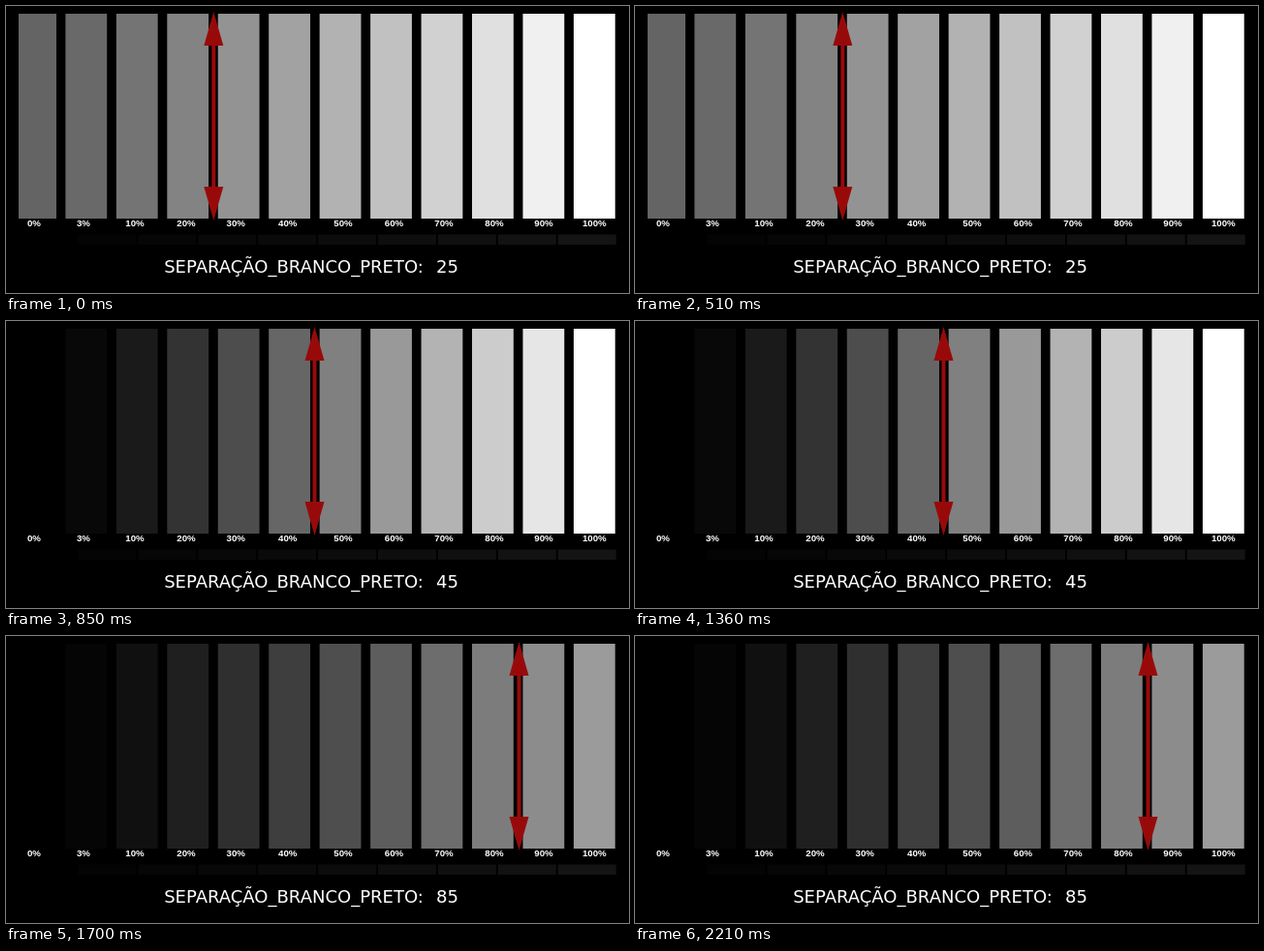
Write an HTML page that moves like this. It is 643x297 px and loops after 2550 ms.

```html
<!DOCTYPE html>
<html lang="pt">
<head>
<meta charset="utf-8">
<title>Separação branco e preto</title>
<style>
  html, body { margin: 0; width: 100%; height: 100%; overflow: hidden; background: #000; }
  svg { display: block; width: 643px; height: 297px; }
  .label { font: bold 9.7px "Liberation Sans", Arial, sans-serif; fill: #fff; text-anchor: middle; }
  .caption { font: 18px "DejaVu Sans", sans-serif; fill: #fff; }
  .arrow { fill: #980a0a; }
  .scene { visibility: hidden; animation: show 2550ms step-end infinite; }
  @keyframes show {
    0% { visibility: visible; }
    33.3333%, 100% { visibility: hidden; }
  }
</style>
</head>
<body>
<svg id="stage" viewBox="0 0 643 297">
  <text class="caption" x="163.2" y="276">SEPARAÇÃO_BRANCO_PRETO:</text>
</svg>
<script>
  const stage = document.getElementById('stage');
  const levels = [0, 3, 10, 20, 30, 40, 50, 60, 70, 80, 90, 100];
  const labelX = [29, 80, 133, 186, 237.3, 290.7, 348, 400.5, 452, 504, 555, 607.3];

  // black and white are the output greys at 0% and 100%
  const scenes = [
    { value: 25, black: 100, white: 255, x: 214.3 },
    { value: 45, black: 0, white: 255, x: 318.5 },
    { value: 85, black: 0, white: 155, x: 529.5 }
  ];

  function add(parent, tag, attrs, text) {
    const el = document.createElementNS('http://www.w3.org/2000/svg', tag);
    for (const key in attrs) el.setAttribute(key, attrs[key]);
    if (text !== undefined) el.textContent = text;
    parent.appendChild(el);
    return el;
  }

  function box(parent, x, y, width, height, grey) {
    const g = Math.round(grey);
    add(parent, 'rect', { x, y, width, height, fill: `rgb(${g},${g},${g})` });
  }

  levels.forEach((level, i) => {
    add(stage, 'text', { class: 'label', x: labelX[i], y: 228.3 }, level + '%');
  });

  for (let i = 0; i < 9; i++) box(stage, 74.5 + 61.9 * i, 236.5, 60, 10.5, 4 + 2 * i);

  scenes.forEach(({ value, black, white, x }, n) => {
    const scene = add(stage, 'g', { class: 'scene' });
    scene.style.animationDelay = n * 850 - 2550 + 'ms';

    levels.forEach((level, i) => {
      const left = i ? 61.4 + 52.45 * (i - 1) : 13;
      box(scene, left, 8, i ? 42.8 : 39, 212, black + (white - black) * level / 100);
    });

    add(scene, 'path', {
      class: 'arrow',
      d: `M${x} 6l10 35h-8v146h8l-10 35l-10-35h8v-146h-8z`
    });
    add(scene, 'text', { class: 'caption', x: 444, y: 276 }, value);
  });
</script>
</body>
</html>
```
